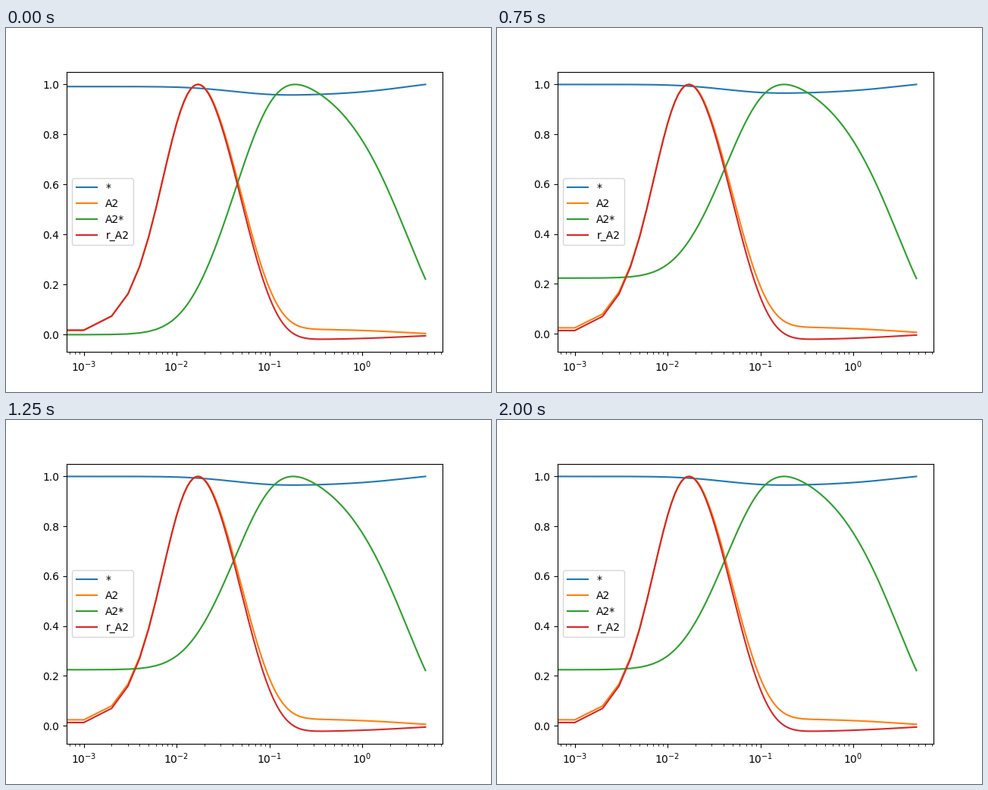
Animation, 640 px wide and 480 px high, one loop 7500 ms. Source, as a matplotlib script:

```python
import numpy as np
import matplotlib.pyplot as plt
from matplotlib.animation import FuncAnimation

FRAMES, INTERVAL = 30, 250
RATE = 0.19                       # remaining error kept at each iteration
RISE, ORDER = 0.0087, 2.13        # build-up of A2
DECAY, LIFETIME = 0.0415, 3.04    # decay of A2 and of A2*

t = np.arange(4801) * 0.001


def unit(y):
    return y / y.max()


# A2 builds up, decays and feeds A2*
growth = (t / RISE)**ORDER
pulse = unit(growth / (1 + growth) * np.exp(-t / DECAY))
fed = np.concatenate([[0], np.cumsum(pulse[1:] + pulse[:-1])])
fed /= fed[-1]
fade = np.exp(-t / LIFETIME)


def curves(n):
    """The four traces after n iterations."""
    done = 1 - RATE**n
    early = 0.9915 + 0.0085 * done
    late = 1 + (0.058 - 0.010 * done) * (fade[-1] - fade)
    star = early * (1 - fed) + late * fed
    base = 0.209 * done
    bound = unit((base + (1 - base) * fed) * fade)
    dimer = unit(pulse + (0.022 + 0.005 * done) * bound)
    resid = unit(pulse - (0.019 + 0.004 * done) * bound)
    return star, dimer, bound, resid


fig, ax = plt.subplots(figsize=(6.4, 4.8), dpi=100)
ax.set_xscale("log")
x = np.maximum(t, 1e-9)  # runs the lines past the left edge
lines = [ax.plot(x, y, label=name)[0]
         for y, name in zip(curves(0), ["*", "A2", "A2*", "r_A2"])]
pad = (t[-1] / t[1])**0.05
ax.set_xlim(t[1] / pad, t[-1] * pad)
ax.legend(loc="center left")


def update(n):
    data = curves(n)
    for line, y in zip(lines, data):
        y[0] = y[1]  # flat lead-in before the first sample
        line.set_ydata(y)
    low = min(y.min() for y in data)
    margin = 0.05 * (1 - low)
    ax.set_ylim(low - margin, 1 + margin)
    return lines


anim = FuncAnimation(fig, update, frames=FRAMES, interval=INTERVAL,
                     repeat=True, repeat_delay=0)
plt.show()
```
